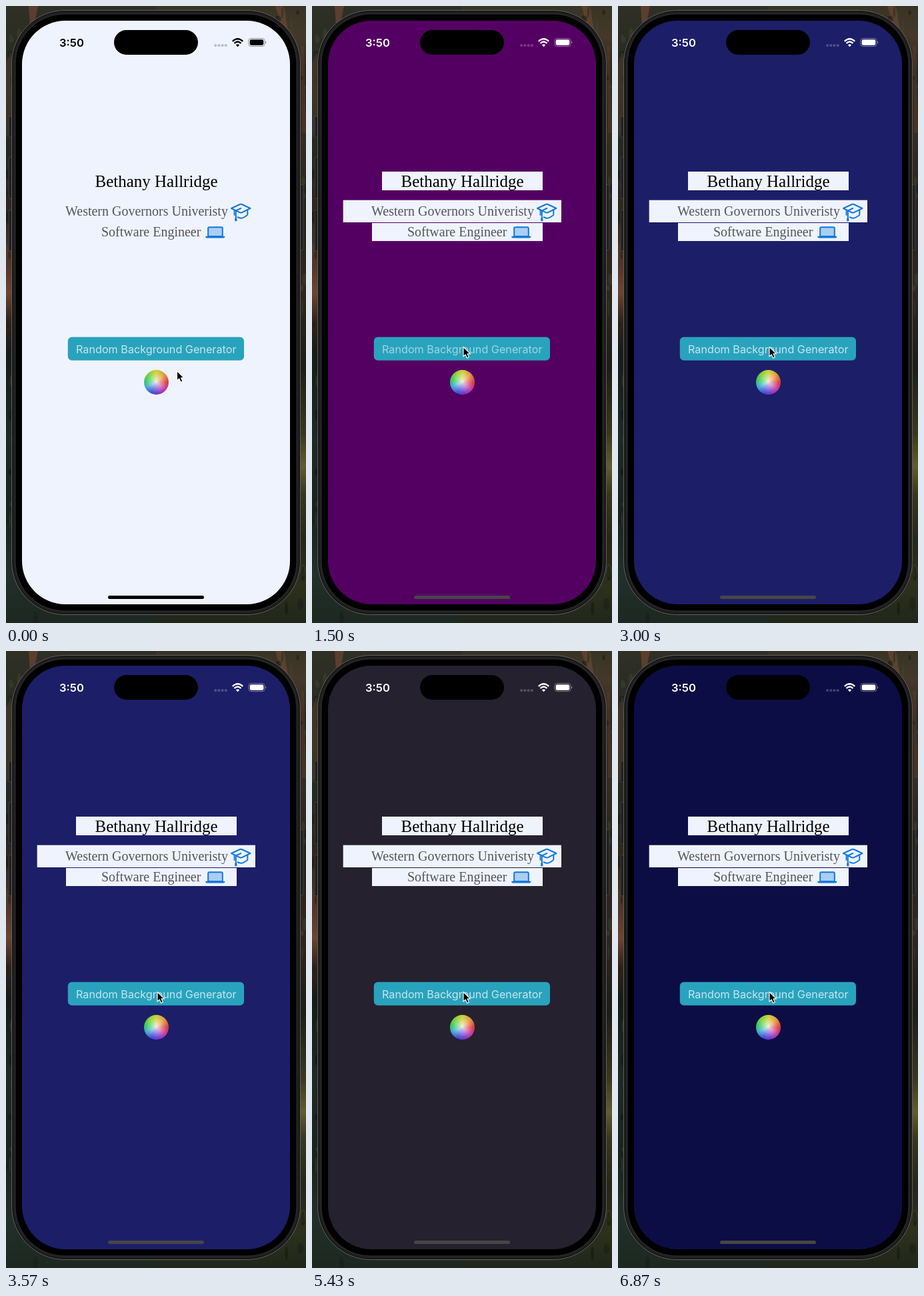
An HTML page for the animation above (6.91 s loop, 450 by 924 pixels).

```html
<!DOCTYPE html>
<html lang="en">
<head>
<meta charset="utf-8">
<title>Random Background Generator</title>
<style>
  html, body { margin: 0; width: 100%; height: 100%; overflow: hidden; background: #1c2019; }
  #stage { position: relative; width: 450px; height: 924px; overflow: hidden; }
  #stage > * { position: absolute; }
  svg { left: 0; top: 0; display: block; }
  .strip { top: 0; width: 225px; height: 924px; }
  .left {
    left: 0;
    background: linear-gradient(#2f3026 0, #292d22 50px, #2b2f24 130px, #232820 230px,
      #33271f 320px, #55362a 390px, #6e4430 430px, #33241c 470px, #151b19 520px,
      #1d2a25 640px, #18231e 760px, #22302a 850px, #1c2820 924px);
  }
  .right {
    right: 0;
    background: linear-gradient(#383425 0, #44382a 45px, #2a261f 100px, #352d24 200px,
      #26231d 300px, #30261f 420px, #1d1d18 540px, #39381f 640px, #615d30 690px,
      #38381f 730px, #25271a 800px, #2c311d 870px, #20261a 924px);
  }
  .wheel {
    left: 207px; top: 545px; width: 37px; height: 37px; border-radius: 50%;
    background:
      radial-gradient(circle, rgba(255,255,255,.8) 0, rgba(255,255,255,.25) 42%, rgba(255,255,255,0) 62%),
      conic-gradient(#cfcf3a, #e39a38 45deg, #d93c44 90deg, #c63ba2 130deg,
        #7339d0 170deg, #4450d8 205deg, #3dabd0 245deg, #38cb60 280deg, #80d23c 320deg, #cfcf3a);
  }
  .serif { font-family: "Liberation Serif", "Times New Roman", serif; }
  .sans { font-family: Inter, "Liberation Sans", sans-serif; }
</style>
</head>
<body>
<div id="stage">
  <div class="strip left"></div>
  <div class="strip right"></div>

  <svg width="450" height="924" viewBox="0 0 450 924">
    <g fill="#6b4432" opacity=".75">
      <path d="M34 0H48L42 30H36Z"/>
      <path d="M0 85L8 70V180L0 200Z" opacity=".4"/>
      <path d="M404 0H416L424 40H416Z"/>
      <path d="M442 60H447L450 190H444Z" opacity=".5"/>
    </g>
    <g id="foliage"></g>

    <g fill="#202020" stroke="#484848" stroke-width=".8">
      <rect x="4" y="165.500" width="7" height="31" rx="1.500"/>
      <rect x="4" y="226.500" width="7" height="62" rx="1.500"/>
      <rect x="4" y="305.500" width="7" height="61" rx="1.500"/>
      <rect x="439" y="267.500" width="7" height="98" rx="1.500"/>
    </g>
    <rect x="8.500" y="6.500" width="433" height="905" rx="80" fill="#202020" stroke="#616161"/>
    <rect x="10" y="8" width="430" height="902" rx="78" fill="none" stroke="#111"/>
    <rect x="14" y="12" width="422" height="894" rx="74" fill="#000" stroke="#303030"/>
    <rect id="screen" x="24" y="22" width="402" height="874" rx="65"/>
    <rect x="162" y="36" width="126" height="37" rx="18.500"/>

    <g id="status" fill="currentColor">
      <text class="sans" x="80" y="61" font-size="16.600" font-weight="600">3:50</text>
      <g opacity=".22">
        <circle cx="314.200" cy="59" r="2.100"/><circle cx="319.400" cy="59" r="2.100"/>
        <circle cx="324.600" cy="59" r="2.100"/><circle cx="329.800" cy="59" r="2.100"/>
      </g>
      <g fill="none" stroke="currentColor" stroke-width="2.300">
        <path d="M339.800 52.800Q347.500 45.800 355.200 52.800"/>
        <path d="M342.500 55.800Q347.500 51.300 352.500 55.800"/>
      </g>
      <path d="M344.800 58.300Q347.500 56 350.200 58.300L347.500 61.200Z"/>
      <rect x="363.900" y="48.500" width="24.200" height="12" rx="3.800" fill="none" stroke="currentColor" opacity=".4"/>
      <rect x="365.700" y="50.200" width="20.600" height="8.600" rx="2.300"/>
      <path d="M389.300 52.500Q391.500 54.500 389.300 56.600Z" opacity=".5"/>
    </g>

    <g fill="#eff3fe">
      <rect x="105" y="248" width="241" height="28"/>
      <rect x="46.700" y="290.700" width="327.300" height="33.300"/>
      <rect x="90" y="325" width="256" height="27"/>
    </g>
    <g class="serif" font-size="20" fill="#55565a">
      <text x="133.500" y="271" font-size="25" fill="#000">Bethany Hallridge</text>
      <text x="89" y="314">Western Governors Univeristy</text>
      <text x="143" y="345">Software Engineer</text>
    </g>

    <g fill="none" stroke="#1179dc" stroke-width="2" stroke-linejoin="round" stroke-linecap="round">
      <path d="M338 303L351 297Q352.300 296.500 353.600 297L366.500 303L353.600 309.300Q352.300 309.900 351 309.300Z"/>
      <path d="M342.600 306V313M347.500 316.200Q352.500 319.300 357 316.500L361.600 313.500Q362.300 313 362.300 312V306"/>
      <path d="M352.300 303L346 305.800Q344.800 306.500 344.800 308V318"/>
      <path d="M344.800 318.500V321" stroke-width="3.200"/>
      <path d="M303.200 345V333Q303.200 331.300 305 331.300H323Q324.800 331.300 324.800 333V345Z" fill="#a9cef1"/>
      <path d="M299.300 344.800H328.300V345.500Q328.300 347.600 326.200 347.600H301.400Q299.300 347.600 299.300 345.500Z" fill="#1179dc" stroke="none"/>
    </g>

    <rect x="92.800" y="495.800" width="264.200" height="35" rx="6" fill="#29a3bd"/>
    <text id="label" class="sans" x="105" y="519.800" font-size="16.200" fill="#c7e5ee">Random Background Generator</text>
    <rect id="home" x="153" y="883" width="144" height="5" rx="2.500"/>
  </svg>

  <div class="wheel"></div>
  <svg width="450" height="924" viewBox="0 0 450 924">
    <path id="cursor" d="M0 0V14.500L3.300 11.500L5.600 16.700L8.400 15.500L6.100 10.400H10.500Z"
      fill="#000" stroke="#fff" stroke-width="1.100" stroke-linejoin="round"/>
  </svg>
</div>

<script>
  const LOOP = 6910;
  const LIGHT = "#eff3fe";
  const scenes = [
    [0, LIGHT], [1500, "#540062"], [2620, "#1c1e68"], [4640, "#25212f"], [5800, "#0d0d45"]
  ];
  const $ = id => document.getElementById(id);
  const clamp = v => Math.max(0, Math.min(1, v));
  const ease = p => p * p * (3 - 2 * p);

  // Soft dark and mossy blotches around the phone.
  function growFoliage() {
    let seed = 7;
    const rand = () => (seed = seed * 16807 % 2147483647) / 2147483647;
    const tones = ["#0c100c", "#161a14", "#4a4a2c", "#3b4a38"];
    let blots = "";
    for (let i = 0; i < 160; i++) {
      const x = rand() < 0.5 ? rand() * 45 : 450 - rand() * 45;
      const y = rand() * 924;
      const rx = 1 + rand() * 4;
      const ry = 3 + rand() * 10;
      blots += `<ellipse cx="${x}" cy="${y}" rx="${rx}" ry="${ry}" fill="${tones[i % 4]}" opacity=".4"/>`;
    }
    $("foliage").innerHTML = blots;
  }

  // The label dims while the button is held, then recovers.
  function pressDepth(t) {
    return Math.max(...scenes.slice(1).map(([at]) =>
      Math.min(clamp((t - at + 140) / 50), clamp((at + 180 - t) / 180))));
  }

  function draw(t) {
    const color = scenes.filter(([at]) => at <= t).pop()[1];
    const light = color === LIGHT;
    $("screen").setAttribute("fill", color);
    $("status").style.color = light ? "#000" : "#fff";
    $("home").setAttribute("fill", light ? "#000" : "#464646");
    $("label").setAttribute("opacity", 1 - 0.25 * pressDepth(t));

    const p = ease(clamp((t - 100) / 600));
    $("cursor").setAttribute("transform", `translate(${256.5 - 29.5 * p} ${546.5 - 36 * p})`);
  }

  growFoliage();
  const start = performance.now();
  function tick() {
    draw((performance.now() - start) % LOOP);
    requestAnimationFrame(tick);
  }
  tick();
</script>
</body>
</html>
```
